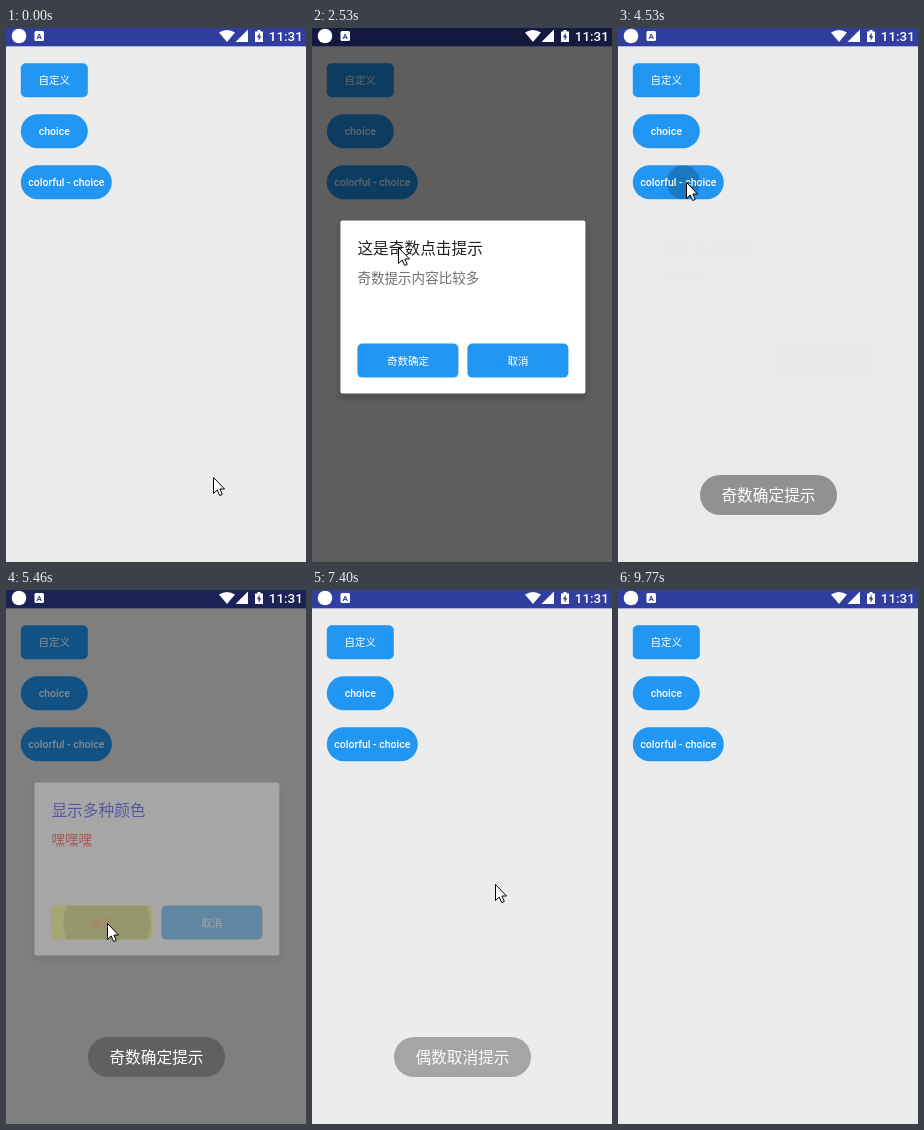
These frames come from a looping animation (300 px wide and 534 px high, 9.84 s). An HTML page:

```html
<!DOCTYPE html>
<html lang="zh-CN">
<head>
<meta charset="utf-8">
<style>
  html, body { margin: 0; width: 100%; height: 100%; overflow: hidden; }
  body { position: relative; background: #ececec; font-family: Roboto, "Noto Sans CJK SC", "Noto Sans CJK", sans-serif; }
  div, svg { position: absolute; box-sizing: border-box; }
  #bar { left: 0; top: 0; width: 100%; height: 19px; background: #303f9f; border-bottom: 1px solid #aeb3d2; }
  #page { left: 0; top: 0; transform: translate(-.2px, .3px); }
  #dim { inset: 0; background: #000; }
  #status { left: 0; top: 0; }
  .btn { overflow: hidden; background: #2196f3; color: #fff; font-size: 10.5px; font-weight: 500; text-align: center; white-space: nowrap; }
  .btn span { position: absolute; inset: 0; }
  .btn i { position: absolute; border-radius: 50%; background: #00000034; }
  #dialog { inset: 0; transform: translate(.4px, -.4px); }
  #panel { left: 28px; top: 193px; width: 245px; height: 173px; background: #fff; border-radius: 2px; box-shadow: 0 4px 4px 2px #0002; }
  #title, #content { left: 45px; line-height: 20px; white-space: nowrap; }
  #title { top: 211px; font-size: 15.7px; }
  #content { top: 240px; font-size: 13.55px; }
  #toast { left: 82px; top: 447px; width: 137px; height: 40px; border-radius: 20px; background: rgba(70, 70, 70, .54);
    color: #fff; font-size: 15.7px; line-height: 41px; text-align: center; white-space: nowrap; }
</style>
</head>
<body>
<div id="bar"></div>
<div id="page"></div>
<div id="dim"></div>
<svg id="status" width="300" height="18" fill="#fff">
  <circle cx="13" cy="8" r="7.3"/>
  <rect x="28.5" y="3" width="9.5" height="10" rx="1.5"/>
  <text x="33.2" y="11" font-size="8" font-weight="700" text-anchor="middle" fill="#303f9f">A</text>
  <path d="M213 4.600Q221 -.6 229 4.600L221 14Z"/>
  <path d="M242 1.500V14H229.500Z"/>
  <path d="M249 3.500h2.500V2h3v1.500H257V14h-8Z"/>
  <path d="M253.700 4.800L250.800 9.300H252.600V12.800L255.400 8.200H253.700Z" fill="#303f9f"/>
  <text x="262.800" y="13" font-size="13.400" font-weight="500">11:31</text>
</svg>
<div id="dialog">
  <div id="panel"></div>
  <div id="title"></div>
  <div id="content"></div>
</div>
<div id="toast"></div>
<svg id="cursor" width="14" height="21" style="left:0;top:0;overflow:visible">
  <path d="M.5 .5V16.500L4.200 13L6.700 18.500L9.300 17.400L6.900 12H11.500Z" fill="#fff" stroke="#000"/>
</svg>
<script>
const LOOP = 9840, FADE = 220;
const $ = id => document.getElementById(id);
const clamp = v => Math.max(0, Math.min(1, v));

function makeButton(parent, x, y, w, h, radius, label) {
  const el = document.createElement('div');
  el.className = 'btn';
  el.style.cssText = `left:${x}px;top:${y}px;width:${w}px;height:${h}px;line-height:${h + 1}px;border-radius:${radius}px`;
  const ripple = document.createElement('i'), text = document.createElement('span');
  text.textContent = label;
  el.append(ripple, text);
  parent.append(el);
  return { el, ripple, text, w, h };
}

const menu = [
  makeButton($('page'), 15, 35, 67, 34, 5, '自定义'),
  makeButton($('page'), 15, 86, 67, 34, 17, 'choice'),
  makeButton($('page'), 15, 137, 91, 34, 17, 'colorful - choice')
];
const answers = [
  makeButton($('dialog'), 45, 316, 101, 34, 5, '确定'),
  makeButton($('dialog'), 155, 316, 101, 34, 5, '取消')
];

const plain = { title: 'title', content: 'content', ok: '确定', menu: 0 };
const odd = { title: '这是奇数点击提示', content: '奇数提示内容比较多', ok: '奇数确定', menu: 1 };
const even = { title: '这是偶数点击提示', content: '偶数提示内容比较少', ok: '偶数确定比...', menu: 1 };
const colorful = { title: '显示多种颜色', content: '嘿嘿嘿', ok: '确定', menu: 2, colorful: true };

const dialogs = [
  { ...plain, open: 640, press: 1490, close: 1640, answer: 0 },
  { ...odd, open: 2200, press: 3100, close: 3244, answer: 0 },
  { ...colorful, open: 4530, press: 5200, close: 5410, answer: 0 },
  { ...even, open: 6150, press: 7050, close: 7180, answer: 1 },
  { ...colorful, open: 7950, press: 8860, close: 9040, answer: 1 }
];
const toasts = [
  { text: '奇数确定提示', show: 3244, hide: 5500 },
  { text: '偶数取消提示', show: 7180, hide: 9500 }
];

// time, x, y of the pointer tip
const pointer = [
  [0, 207, 449], [540, 52, 57], [730, 52, 57], [990, 98, 274], [1270, 110, 322],
  [1640, 110, 322], [2080, 54, 105], [2260, 54, 105], [2800, 118, 332], [3240, 128, 336],
  [3430, 187, 348], [3620, 200, 330], [4250, 68, 154], [4620, 68, 154], [5120, 101, 333],
  [5490, 101, 333], [5950, 54, 105], [6200, 54, 105], [6640, 225, 348], [6800, 225, 348],
  [7000, 216, 335], [7260, 216, 335], [7720, 70, 154], [8040, 70, 154], [8490, 218, 334],
  [8530, 218, 334], [8690, 202, 322], [9060, 202, 322], [9320, 310, 450], [LOOP, 310, 450]
];

function pointerAt(t) {
  const next = pointer.findIndex(key => key[0] > t);
  const [t0, x0, y0] = pointer[next - 1], [t1, x1, y1] = pointer[next];
  const p = (t - t0) / (t1 - t0), s = p * p * (3 - 2 * p);
  return [x0 + (x1 - x0) * s, y0 + (y1 - y0) * s];
}

function setRipple(button, age, opacity = 1) {
  const r = Math.min(110, Math.max(0, age) / 6);
  button.ripple.style.cssText =
    `left:${button.w / 2 + 5 - r}px;top:${button.h / 2 - r}px;width:${2 * r}px;height:${2 * r}px;opacity:${opacity}`;
}

function drawDialog(t) {
  const d = dialogs.find(item => t >= item.open && t < item.close + FADE);
  $('dialog').style.opacity = 0;
  if (!d) return 0;

  const shown = clamp((t - d.open) / FADE), hidden = clamp((t - d.close) / FADE);
  $('dialog').style.opacity = (1 - (1 - shown) ** 3) * (1 - hidden) ** 4.5;
  $('title').textContent = d.title;
  $('title').style.color = d.colorful ? '#00e' : '#212121';
  $('content').textContent = d.content;
  $('content').style.color = d.colorful ? '#f00' : '#707070';

  const ok = answers[0], pressed = d.answer === 0 && t >= d.press;
  ok.text.textContent = d.ok;
  ok.el.style.background = d.colorful ? (pressed ? '#ffff60' : '#fff') : '#2196f3';
  ok.el.style.color = d.colorful ? (pressed ? '#ff8a3c' : '#ffa000') : '#fff';
  ok.el.style.boxShadow = d.colorful ? 'inset 0 0 0 1px #ffff40' : 'none';
  answers.forEach((button, i) => setRipple(button, i === d.answer ? t - d.press : 0));
  return .6 * shown * (1 - hidden);
}

function drawToast(t) {
  const toast = toasts.find(item => t >= item.show && t < item.hide + 300);
  $('toast').style.opacity = 0;
  if (!toast) return;
  const enter = clamp((t - toast.show) / 400), exit = clamp((t - toast.hide) / 300);
  $('toast').textContent = toast.text;
  $('toast').style.opacity = (1 - (1 - enter) ** 2) * (1 - exit) ** 2;
}

function draw(t) {
  $('dim').style.opacity = drawDialog(t);
  menu.forEach((button, i) => {
    const tap = dialogs.find(d => d.menu === i && t >= d.open - 100 && t < d.open + FADE);
    setRipple(button, tap ? t - tap.open + 100 : 0, tap ? 1 - clamp((t - tap.open) / FADE) : 0);
  });
  drawToast(t);
  const [x, y] = pointerAt(t);
  $('cursor').style.transform = `translate(${Math.round(x)}px, ${Math.round(y)}px)`;
}

function tick() {
  draw(performance.now() % LOOP);
  requestAnimationFrame(tick);
}
tick();
</script>
</body>
</html>
```
